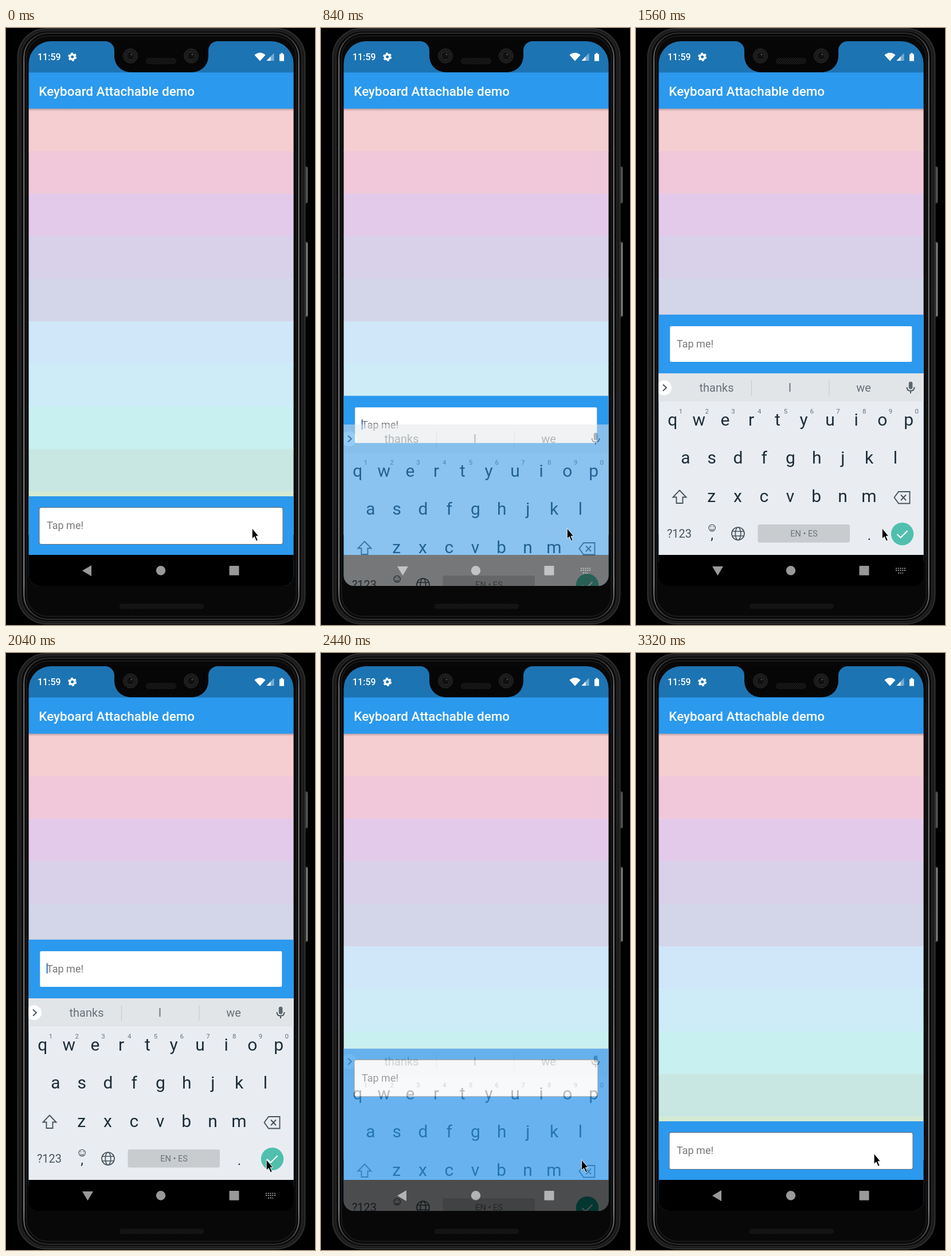
An HTML page for the animation above (3.92 s loop, 539 by 1039 pixels).

```html
<!DOCTYPE html>
<html lang="en">
<head>
<meta charset="utf-8">
<title>Keyboard Attachable demo</title>
<style>
  html, body { margin: 0; width: 100%; height: 100%; overflow: hidden; background: #000; }
  svg { display: block; width: 100%; height: 100%; }
  text { font-family: Roboto, sans-serif; }
  .mid { text-anchor: middle; }
  .line { fill: none; stroke: #47545c; stroke-width: 1.9; }
</style>
</head>
<body>
<svg viewBox="0 0 539 1039">
  <defs>
    <clipPath id="screen"><path d="M39.6 62A39 39 0 0 1 78.6 23H462.6A39 39 0 0 1 501.6 62V953A18 18 0 0 1 483.6 971H57.6A18 18 0 0 1 39.6 953Z"/></clipPath>
    <linearGradient id="shade" x2="0" y2="1">
      <stop stop-color="#000" stop-opacity=".25"/><stop offset="1" stop-color="#000" stop-opacity="0"/>
    </linearGradient>
    <linearGradient id="rim" x2="0" y2="1">
      <stop stop-color="#2c2c2c"/><stop offset=".05" stop-color="#7c7c7c"/>
      <stop offset=".94" stop-color="#999"/><stop offset="1" stop-color="#2c2c2c"/>
    </linearGradient>
    <pattern id="mesh" width="4" height="4" patternUnits="userSpaceOnUse">
      <rect width="4" height="4" fill="#1d1d1d"/><path d="M0 4L4 0M0 0L4 4" stroke="#0b0b0b"/>
    </pattern>
  </defs>

  <!-- phone body -->
  <g fill="#3c3c3c">
    <rect x="520" y="241" width="6.5" height="64" rx="2"/><rect x="520" y="372" width="6.5" height="131" rx="2"/>
  </g>
  <path d="M525 243V303" stroke="#666" stroke-width="1.5"/>
  <path d="M525 374V501" stroke="#aaa" stroke-width="1.5"/>
  <rect x="20.5" y="1" width="501" height="1036" rx="50" fill="#1b1b1b" stroke="#303030" stroke-width="2"/>
  <rect x="26" y="5" width="490" height="1028" rx="46" fill="#0a0a0a" stroke="#242424" stroke-width="2"/>
  <rect x="31.3" y="9" width="479.4" height="1020" rx="42" fill="#080808" stroke="url(#rim)" stroke-width="1.8"/>
  <rect x="35.5" y="14" width="471" height="1010" rx="38" fill="none" stroke="#191919" stroke-width="2"/>
  <rect x="198" y="1002" width="147" height="9" rx="4" fill="url(#mesh)"/>

  <g clip-path="url(#screen)">
    <g id="bands"></g>
    <rect x="39" y="140" width="463" height="5" fill="url(#shade)"/>
    <rect x="39" y="22" width="463" height="56" fill="#1d74b3"/>
    <rect x="39" y="77.5" width="463" height="62.9" fill="#2b99ee"/>
    <text x="57.3" y="117.5" font-size="22.48" font-weight="500" fill="#fff">Keyboard Attachable demo</text>

    <!-- status icons -->
    <g fill="#fff">
      <text x="55" y="56.3" font-size="16" font-weight="500">11:59</text>
      <g fill="none" stroke="#fff">
        <circle cx="115.7" cy="50.3" r="4.2" stroke-width="3.4"/>
        <circle cx="115.7" cy="50.3" r="6.2" stroke-width="2.6" stroke-dasharray="3.5 2.993"/>
      </g>
      <path d="M433.5 47Q443 39 452.5 47L443 57.5Z"/>
      <path d="M454.5 57L467.5 43.5V57Z" opacity=".4"/><path d="M454.5 57L461.5 49.8V57Z"/>
      <path d="M477 45.5h2.3v-2h3.4v2h2.3v12h-8z"/>
    </g>

    <!-- input panel -->
    <g id="panel">
      <rect x="39" width="463" height="430" fill="#2b99ee"/>
      <rect id="idle" x="58" y="19.3" width="425" height="64.2" rx="3.5" fill="#fff" stroke="#667480" stroke-width="1.2"/>
      <rect id="focus" x="59.3" y="20.2" width="422" height="62" rx="2" fill="#fff"/>
      <rect id="caret" x="70.6" y="41" width="2.3" height="18" fill="#4285d4"/>
      <text x="71" y="57" font-size="18" fill="#777">Tap me!</text>
    </g>

    <!-- navigation bar -->
    <rect x="39" y="917" width="463" height="54" fill="#000"/>
    <g fill="#999">
      <path id="back" d="M133 944.5L149 935V954Z"/>
      <path id="down" d="M133 937H152L142.5 953Z"/>
      <circle cx="270" cy="944.3" r="8.2"/>
      <rect x="389.5" y="936" width="17" height="16.5" rx="1"/>
      <path id="dots" d="M453 940.5H470M453 944H470M457 948.5H466" stroke="#999" stroke-width="2" stroke-dasharray="2 1.75"/>
    </g>

    <!-- soft keyboard -->
    <g id="board">
      <rect x="39" y="601" width="463" height="316" fill="#e9edf2"/>
      <rect x="39" y="601" width="463" height="49" fill="#e2e5e8"/>
      <circle cx="49" cy="626" r="13" fill="#fff"/>
      <path class="line" d="M47 620.5L53 626L47 631.5" stroke-width="2.4"/>
      <path d="M201.5 613V640M337 613V640" stroke="#c9cdd1" stroke-width="1.3"/>
      <rect x="475.8" y="615.5" width="6.6" height="13" rx="3.3" fill="#5b666d"/>
      <path class="line" d="M472.5 625Q472.5 631.5 479 631.5Q485.5 631.5 485.5 625M479 631.5V636"/>
      <path class="line" d="M76 804.5L87.5 816.5H81.5V827H70.5V816.5H64.5Z"/>
      <path class="line" d="M450.5 817L458 807H477.5V827.5H458ZM462 812.5L471 822M471 812.5L462 822"/>
      <g class="line" style="stroke-width:1.2">
        <circle cx="132.7" cy="870" r="5.7"/><path d="M129.8 871.5Q132.7 875.5 135.6 871.5M130.6 867.2V869M134.8 867.2V869"/>
      </g>
      <g class="line" style="stroke-width:1.7">
        <circle cx="178" cy="880" r="11"/><ellipse cx="178" cy="880" rx="4.7" ry="11"/><path d="M168 876H188M168 884H188"/>
      </g>
      <rect x="212.5" y="864" width="160.5" height="31.5" rx="3" fill="#c8cccf"/>
      <circle id="done" cx="464.5" cy="880.5" r="19.7"/>
      <path d="M455.5 881L461.5 887L473.5 875" fill="none" stroke="#fff" stroke-width="2.1"/>
    </g>
  </g>

  <!-- notch -->
  <path d="M173 22V23A16 16 0 0 1 189 39V49A28 28 0 0 0 217 77H325A28 28 0 0 0 353 49V39A16 16 0 0 1 369 23V22Z" fill="#060606"/>
  <g id="lenses"></g>
  <rect x="244" y="52" width="53" height="11" rx="5" fill="url(#mesh)"/>

  <path id="mouse" d="M0 0V18.5L4 14.8L7.2 22.3L10 21L6.8 13.8H11.3Z" fill="#000" stroke="#fff" stroke-width=".9"/>
</svg>
<script>
const LOOP = 3920, STEP = 40;
const $ = id => document.getElementById(id);

function add(parent, tag, attrs, label) {
  const el = document.createElementNS('http://www.w3.org/2000/svg', tag);
  for (const name in attrs) el.setAttribute(name, attrs[name]);
  if (label) el.textContent = label;
  $(parent).append(el);
}

const key = (x, y, size, fill, label) =>
  add('board', 'text', { class: 'mid', x, y, 'font-size': size, fill }, label);

['#f5ced1', '#f0c8da', '#e4caea', '#d9d0e9', '#d3d5e8',
 '#d0e6f9', '#cdecf7', '#c9f0f0', '#c9e7e2', '#d5ead3'].forEach((fill, i) =>
  add('bands', 'rect', { x: 39, y: 140 + i * 74.1, width: 463, height: 75, fill }));

for (const cx of [217, 323]) {
  add('lenses', 'circle', { cx, cy: 48.5, r: 12.5, fill: '#1a1a1a', stroke: '#292929' });
  add('lenses', 'circle', { cx, cy: 48.5, r: 7, fill: '#101010', stroke: '#303030' });
  add('lenses', 'circle', { cx: cx + 2, cy: 46, r: 1.5, fill: '#484848' });
}

[['qwertyuiop', 63.9, 692], ['asdfghjkl', 86.4, 758], ['zxcvbnm', 131.8, 825]].forEach(([row, x, y]) =>
  [...row].forEach((c, i) => key(x + i * 45.75, y, 30, '#1d2d38', c)));
[...'1234567890'].forEach((c, i) => key(78 + i * 45.75, 670.5, 11.5, '#68727a', c));
[['thanks', 140.5], ['I', 268.5], ['we', 397]].forEach(([word, x]) => key(x, 633, 20, '#687078', word));
key(75.5, 887, 20, '#47545c', '?123');
key(132.5, 890, 24, '#1d2d38', ',');
key(407, 891, 24, '#1d2d38', '.');
key(293, 885.2, 14.5, '#6a7278', 'EN • ES');

// Piecewise linear value through [time, value] points
function track(t, points) {
  let [t0, v0] = points[0];
  for (const [t1, v1] of points) {
    if (t < t1) return v0 + (v1 - v0) * Math.max(0, t - t0) / (t1 - t0 || 1);
    [t0, v0] = [t1, v1];
  }
  return v0;
}

const ease = p => p * p * (3 - 2 * p);
const move = (t, from, to) => ease(Math.min(1, Math.max(0, (t - from) / (to - from))));
const within = (t, a, b) => t >= a && t < b;
const show = (id, on) => $(id).style.display = on ? '' : 'none';
const place = (id, x, y) => $(id).setAttribute('transform', `translate(${x} ${y})`);

function draw(t) {
  const lift = track(t, [[800, 0], [840, .553], [880, .9], [920, .997], [1000, 1],
    [2360, 1], [2400, .86], [2440, .4], [2480, .06], [2520, 0]]);
  place('panel', 0, 815 - 316.2 * lift);

  const drop = track(t, [[800, 158], [840, 89], [880, 25], [920, 4.8], [960, 1], [1040, 0],
    [2320, 0], [2360, 6], [2400, 32], [2440, 85], [2480, 158]]);
  const alpha = track(t, [[800, 0], [840, .5], [880, .76], [920, .92], [1000, 1],
    [2320, 1], [2360, .92], [2400, .68], [2440, .32], [2480, 0]]);
  place('board', 0, drop);
  $('board').setAttribute('opacity', alpha);
  $('done').setAttribute('fill', within(t, 2200, 2500) ? '#0fa89b' : '#50bfae');

  const focused = within(t, 640, 2320);
  show('focus', focused);
  show('idle', !focused);
  show('caret', within(t, 640, 1160) || within(t, 1640, 2160));

  const open = within(t, 800, 2320);
  show('down', open);
  show('dots', open);
  show('back', !open);

  const go = move(t, 1560, 2080), leave = move(t, 2760, 3120);
  place('mouse', 429.3 + 25.3 * go - 39.5 * leave, 870.5 + 11.3 * go - 10.8 * leave);
}

function frame() {
  const t = performance.now() % LOOP;
  draw(t - t % STEP);
  requestAnimationFrame(frame);
}
frame();
</script>
</body>
</html>
```
